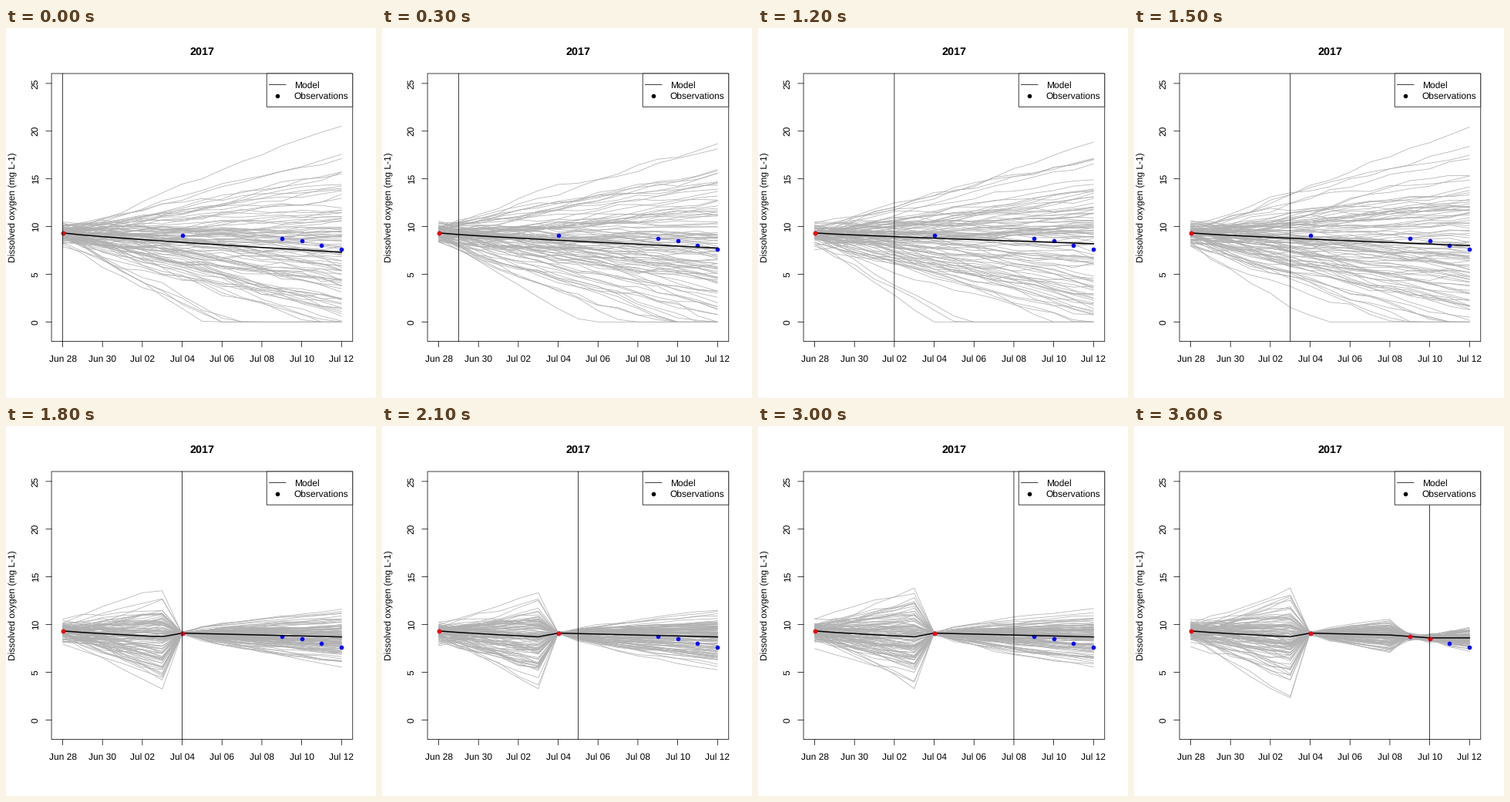
These frames come from a looping animation (480x480 px, 3900 ms). A matplotlib script:

```python
import numpy as np
import matplotlib.pyplot as plt
from matplotlib.animation import FuncAnimation
from matplotlib.collections import LineCollection
from matplotlib.patches import Rectangle

SIZE, DPI = 480, 96
PX = 72 / DPI                       # points per pixel
LEFT, RIGHT, TOP, BOTTOM = 59.04, 449.76, 59.04, 406.56
LINE = 14.4                         # height of one text line
THIN = 0.75
DAYS, STEPS, MEMBERS = 14, 13, 100
GRAY = "#b0b0b0"

OBS = {0: 9.3, 6: 9.1, 11: 8.74, 12: 8.5, 13: 8.0, 14: 7.66}
FREE_END = [7.3, 7.75, 7.9, 8.05, 8.2, 8.0]   # mean on the last day, no update yet
# update day: mean, drift per day, spread of the members
UPDATES = {6: (9.1, -0.05, 0.07), 11: (8.75, -0.05, 0.16), 12: (8.6, 0.0, 0.19)}

plt.rcParams.update({"font.family": "Liberation Sans", "path.snap": False,
                     "text.hinting": "none"})


def px(day):
    return 73.51 + 25.842 * np.asarray(day, float)


def py(value):
    return 381.31 - 12.376 * np.asarray(value, float)


def deviates(rng, low, high):
    """Normal deviates with one fixed member at each extreme."""
    z = np.clip(rng.normal(size=MEMBERS), -2.2, 2.2)
    z = (z - z.mean()) / z.std()
    z[:2] = low, high
    return z[:, None]


def forecast(today):
    """Mean curve and ensemble members as known on the given day."""
    rng = np.random.default_rng(40 + today)
    starts = [0] + [d for d in UPDATES if d <= today]
    means, members = [], []
    for a, b in zip(starts, starts[1:] + [DAYS + 1]):
        t = np.arange(b - a)
        if a == 0:
            end = FREE_END[today] if today < 6 else 7.85
            mean = 9.33 + (end - 9.33) * (t / DAYS) ** 0.85
            base, growth, wobble = 0.5, 0.4 * t ** 0.9, 0.22
            z = deviates(rng, -rng.uniform(2.6, 3), rng.uniform(2.5, 2.7))
        else:
            start, drift, base = UPDATES[a]
            mean = start + drift * t
            growth, wobble = 0.26 * t ** 0.7, 0.1
            z = deviates(rng, -2.4, rng.uniform(2.3, 2.8))
        walk = rng.normal(0, wobble, (MEMBERS, len(t))).cumsum(axis=1)
        walk -= walk[:, :1]
        dev = base * rng.normal(size=(MEMBERS, 1)) + z * growth + walk
        dev *= np.where(dev < 0, 1.18, 0.97)
        means.append(mean)
        members.append(np.maximum(mean + dev, 0))
    return np.concatenate(means), np.concatenate(members, axis=1)


RUNS = [forecast(k) for k in range(STEPS)]
X = px(np.arange(DAYS + 1))

fig = plt.figure(figsize=(SIZE / DPI, SIZE / DPI), dpi=DPI, facecolor="white")
ax = fig.add_axes([0, 0, 1, 1])
ax.set(xlim=(0, SIZE), ylim=(SIZE, 0))
ax.axis("off")


def line(x, y, width=THIN, z=5):
    return ax.plot(x, y, color="black", lw=width * PX, zorder=z, snap=False)[0]


def dots(x, y, color, z):
    return ax.plot(x, y, "o", color=color, ms=5.6 * PX, mew=0, zorder=z,
                   snap=False)[0]


def label(x, y, text, size=12, **kw):
    ax.text(x, y, text, fontsize=size * PX, va="baseline", zorder=9,
            rotation_mode="anchor", **{"ha": "center", **kw})


def box(x, y, w, h, fill, z):
    ax.add_patch(Rectangle((x, y), w, h, facecolor=fill, edgecolor="black",
                           lw=THIN * PX, zorder=z, snap=False))


# frame, ticks and labels
box(LEFT, TOP, RIGHT - LEFT, BOTTOM - TOP, "none", 6)
label(254.4, 35, "2017", 14.4, weight="bold")
label(LEFT - 3.2 * LINE, 232.8, "Dissolved oxygen (mg L-1)", rotation=90)
for v in range(0, 26, 5):
    line([LEFT - LINE / 2, LEFT], [py(v)] * 2)
    label(LEFT - 1.2 * LINE, py(v), str(v), rotation=90)
for d in range(0, DAYS + 1, 2):
    line([px(d)] * 2, [BOTTOM, BOTTOM + LINE / 2])
    label(px(d), BOTTOM + 1.8 * LINE,
          f"Jun {28 + d}" if d < 3 else f"Jul {d - 2:02d}")

# legend
box(338.2, TOP, RIGHT - 338.2, 3 * LINE, "white", 7)
line([341.4, 363], [TOP + LINE] * 2, z=8)
dots([352.2], [TOP + 2 * LINE], "black", 8)
label(373.6, 77.7, "Model", ha="left")
label(373.6, 92.1, "Observations", ha="left")

# moving parts
spread = LineCollection([], colors=GRAY, linewidths=THIN * PX, zorder=1,
                        capstyle="round", joinstyle="round")
ax.add_collection(spread)
dots(px(list(OBS)), py(list(OBS.values())), "blue", 2)
mean_line = line([], [], 2 * THIN, z=3)
used = dots([], [], "red", 4)
now = line([], [])


def draw(k):
    mean, members = RUNS[k]
    spread.set_segments([np.column_stack([X, py(m)]) for m in members])
    mean_line.set_data(X, py(mean))
    past = [d for d in OBS if d <= k]
    used.set_data(px(past), py([OBS[d] for d in past]))
    now.set_data([px(k)] * 2, [TOP, BOTTOM])
    return spread, mean_line, used, now


anim = FuncAnimation(fig, draw, frames=STEPS, interval=300, repeat=True,
                     repeat_delay=0, blit=False)
plt.show()
```
